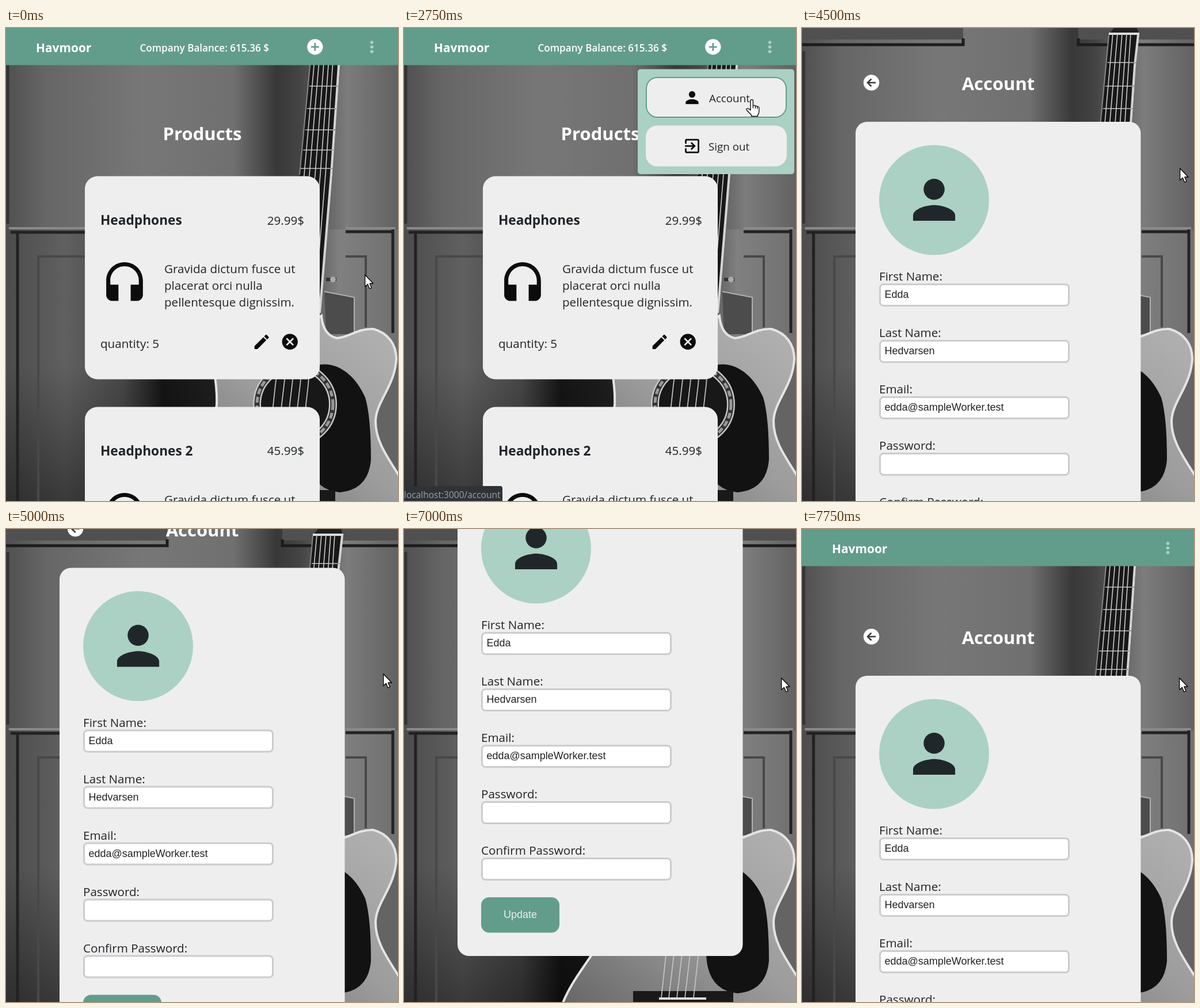
Animation of 681 by 822 pixels, one loop 8 s. Source, as an HTML page:

```html
<!DOCTYPE html>
<html lang="en">
<head>
<meta charset="utf-8">
<title>Shop account</title>
<style>
  html, body { margin: 0; width: 100%; height: 100%; overflow: hidden; background: #555; }
  svg { display: block; width: 100vw; height: 100vh; }
  text { font: 20.6px "Open Sans", "Noto Sans", sans-serif; fill: #212529; white-space: pre; }
  .brand { font-size: 20.9px; font-weight: 700; fill: #fff; }
  .balance { font-size: 17.1px; font-weight: 600; fill: #fff; }
  .title { font-size: 31px; font-weight: 700; fill: #fff; text-anchor: middle; }
  .name { font-size: 22.7px; font-weight: 700; }
  .price { text-anchor: end; }
  .entry { font: 18px "Liberation Sans", Arial, sans-serif; fill: #222; }
  .item { font-size: 18.8px; }
  .link { font-size: 15.5px; fill: #9da2a6; }
  .paper { fill: #eee; }
  .green { fill: #629d8b; }
  .mint { fill: #abd1c4; }
  .ink { fill: #0c0c0c; }
  .box { fill: #fff; stroke: #ccc; stroke-width: 3; }
  .line { fill: none; }

  .step { animation: 8s step-end infinite; }
  #shop { animation-name: shop; }
  #account { animation-name: account; }
  #scroll { animation-name: scroll; }
  #menu { animation-name: menu; }
  #ring { animation-name: ring; }
  #hover { animation-name: hover; }
  #status { animation-name: status; }
  #pointer { animation-name: move; }
  #arrow { animation-name: arrow; }
  #hand { animation-name: hand; }

  @keyframes shop { 0% { visibility: visible } 37.5%, 100% { visibility: hidden } }
  @keyframes account { 0% { visibility: hidden } 37.5%, 100% { visibility: visible } }
  @keyframes menu { 0% { opacity: 0 } 21.875% { opacity: 1 } 37.5%, 100% { opacity: 0 } }
  @keyframes ring { 0% { opacity: 0 } 12.5% { opacity: .06 } 28.125%, 100% { opacity: 0 } }
  @keyframes hover { 0% { opacity: 0 } 28.125% { opacity: 1 } 37.5%, 100% { opacity: 0 } }
  @keyframes status {
    0% { opacity: 0 } 31.25% { opacity: .6 } 34.375% { opacity: 1 }
    40.625% { opacity: .5 } 43.75%, 100% { opacity: 0 }
  }
  @keyframes scroll {
    0% { transform: translateY(0) }
    56.25% { transform: translateY(-92px) }
    59.375% { transform: translateY(-137px) }
    62.5% { transform: translateY(-187.5px) }
    65.625% { transform: translateY(-290px) }
    68.75% { transform: translateY(-405px) }
    71.875% { transform: translateY(-408px) }
    87.5% { transform: translateY(-357px) }
    90.625% { transform: translateY(-160px) }
    93.75% { transform: translateY(-9px) }
    96.875%, 100% { transform: translateY(0) }
  }
  @keyframes move {
    0% { transform: translate(623px, 428px) }
    3.125% { transform: translate(581px, 337px) }
    6.25% { transform: translate(589px, 144px) }
    9.375% { transform: translate(633px, 67px) }
    12.5% { transform: translate(644px, 31px) }
    15.625% { transform: translate(643px, 43px) }
    28.125% { transform: translate(613px, 131px) }
    31.25% { transform: translate(594px, 123px) }
    37.5% { transform: translate(603px, 118px) }
    40.625% { transform: translate(618px, 160px) }
    43.75% { transform: translate(662px, 239px) }
    46.875% { transform: translate(656px, 243px) }
    62.5% { transform: translate(655px, 251px) }
    68.75%, 100% { transform: translate(655px, 258px) }
  }
  @keyframes arrow { 0% { opacity: 1 } 12.5% { opacity: 0 } 37.5%, 100% { opacity: 1 } }
  @keyframes hand { 0% { opacity: 0 } 12.5% { opacity: 1 } 37.5%, 100% { opacity: 0 } }
</style>
</head>
<body>
<svg viewBox="0 0 681 822" preserveAspectRatio="none">
  <defs>
    <linearGradient id="wood">
      <stop offset="0" stop-color="#505050"/>
      <stop offset=".1" stop-color="#666"/>
      <stop offset=".35" stop-color="#777"/>
      <stop offset=".58" stop-color="#707070"/>
      <stop offset=".69" stop-color="#383838"/>
      <stop offset=".75" stop-color="#444"/>
      <stop offset=".87" stop-color="#7c7c7c"/>
      <stop offset="1" stop-color="#626262"/>
    </linearGradient>
    <linearGradient id="panel">
      <stop offset="0" stop-color="#4c4c4c"/>
      <stop offset=".15" stop-color="#606060"/>
      <stop offset=".3" stop-color="#484848"/>
      <stop offset=".4" stop-color="#151515"/>
      <stop offset=".7" stop-color="#2c2c2c"/>
      <stop offset=".85" stop-color="#808080"/>
      <stop offset="1" stop-color="#707070"/>
    </linearGradient>
    <linearGradient id="floor" x2="0" y2="1">
      <stop offset=".5" stop-opacity="0"/>
      <stop offset="1" stop-opacity=".4"/>
    </linearGradient>
    <linearGradient id="body" x1="1" y1="0" x2="0" y2="1">
      <stop offset="0" stop-color="#b4b4b4"/>
      <stop offset=".5" stop-color="#9c9c9c"/>
      <stop offset="1" stop-color="#666"/>
    </linearGradient>
    <path id="person" d="M12 12c2.21 0 4-1.79 4-4s-1.79-4-4-4-4 1.79-4 4 1.79 4 4 4zm0 2c-2.67 0-8 1.34-8 4v2h16v-2c0-2.66-5.33-4-8-4z"/>
    <g id="dots" class="mint">
      <circle cx="635.5" cy="25" r="2.8"/><circle cx="635.5" cy="33" r="2.8"/><circle cx="635.5" cy="41" r="2.8"/>
    </g>
    <g id="bar">
      <rect class="green" width="681" height="64.5"/>
      <text class="brand" x="52" y="42">Havmoor</text>
    </g>
    <g id="card">
      <rect class="paper" x="137" y="257.5" width="408" height="353" rx="22"/>
      <path class="ink" transform="translate(163.5 403.5) scale(3.54)" d="M12 1c-4.97 0-9 4.03-9 9v7c0 1.66 1.34 3 3 3h3v-8H5v-2c0-3.87 3.13-7 7-7s7 3.13 7 7v2h-4v8h3c1.66 0 3-1.34 3-3v-7c0-4.97-4.03-9-9-9z"/>
      <text x="275" y="426">Gravida dictum fusce ut</text>
      <text x="275" y="455">placerat orci nulla</text>
      <text x="275" y="484">pellentesque dignissim.</text>
      <text x="164" y="556">quantity: 5</text>
      <path class="ink" transform="translate(427.5 528.8) scale(1.39)" d="M3 17.25V21h3.75L17.81 9.94l-3.75-3.75L3 17.25zM20.71 7.04c.39-.39.39-1.02 0-1.41l-2.34-2.34c-.39-.39-1.02-.39-1.41 0l-1.83 1.83 3.75 3.75 1.83-1.83z"/>
      <path class="ink" transform="translate(476.8 528.8) scale(1.37)" d="M12 2C6.47 2 2 6.47 2 12s4.47 10 10 10 10-4.47 10-10S17.53 2 12 2zm5 13.59L15.59 17 12 13.41 8.41 17 7 15.59 10.59 12 7 8.41 8.41 7 12 10.59 15.59 7 17 8.41 13.41 12 17 15.59z"/>
    </g>
    <rect id="field" class="box" x="135.5" y="537.5" width="328" height="37" rx="6"/>
  </defs>

  <!-- fixed backdrop: door and guitar -->
  <g>
    <rect width="681" height="360" fill="url(#wood)"/>
    <rect y="350" width="681" height="472" fill="url(#panel)"/>
    <rect y="350" width="681" height="472" fill="url(#floor)"/>
    <path d="M0 0H280V20H0zM480 0H681V20H480z" fill="#505050"/>
    <path class="line" d="M0 29H280V18M480 18V29H681" stroke="#1c1c1c" stroke-width="5"/>
    <path d="M3 40V340" stroke="#333" stroke-width="5"/>
    <path d="M5 348H137M590 348H676" stroke="#8a8a8a" stroke-width="4"/>
    <path class="line" d="M8 355H137M590 354H672M20 356V822M672 350V530" stroke="#222" stroke-width="5"/>
    <path class="line" d="M56 822V397H137M590 397H625V520" stroke="#484848" stroke-width="4"/>
    <path d="M553 458L606 468V532H556z" fill="#4c4c4c"/>
    <path class="line" d="M553 458L605 468V530" stroke="#b0b0b0" stroke-width="2"/>
    <path d="M556 437H574" stroke="#333" stroke-width="6"/>
    <circle cx="568" cy="437" r="5" fill="#aaa"/>
    <path d="M640 522Q681 540 681 600V790L640 700z" fill="#646464"/>
    <path d="M275 826C298 765 360 712 366 655Q367 630 362 600L460 560L548 500Q551 534 575 539C596 538 610 522 638 523C664 530 678 550 678 575C676 622 642 650 642 684C642 722 668 752 690 790V826z" fill="url(#body)" stroke="#e4e4e4" stroke-width="4"/>
    <path d="M545 585C582 580 610 610 624 642Q634 675 634 750Q630 802 580 807Q526 802 525 736Q530 690 545 660z" fill="#121212"/>
    <circle cx="502" cy="654" r="66" fill="#181818" stroke="#c8c8c8" stroke-width="14"/>
    <circle class="line" cx="502" cy="654" r="66" stroke="#333" stroke-width="9"/>
    <circle class="line" cx="502" cy="654" r="66" stroke="#999" stroke-width="5" stroke-dasharray="10 5"/>
    <path d="M534 9L585 9L580 64L567 255L545 495L530 600H462L489 480L510 255L528 64z" fill="#181818"/>
    <path d="M542 0H582L585 10H534z" fill="#202020"/>
    <path d="M533 10H586" stroke="#ddd" stroke-width="4"/>
    <path class="line" d="M584 12L578 66L565 255L545 495" stroke="#d4d4d4" stroke-width="4"/>
    <path class="line" d="M533 12L528 66L510 255" stroke="#888" stroke-width="2"/>
    <path d="M531 60H581M527 101H577M523 140H574M520 177H572M516 212H569M512 244H567" stroke="#999" stroke-width="2"/>
    <path d="M398 803H572V822H398z" fill="#191919"/>
    <path d="M443 816H525" stroke="#ddd" stroke-width="4"/>
    <path class="line" d="M540 10L518 255L468 620L447 815M548 10L527 255L483 620L460 815M556 10L537 255L497 620L474 815M564 10L546 255L511 620L488 815M571 10L555 255L525 620L503 815" stroke="#c4c4c4" stroke-width="1.7"/>
  </g>

  <g id="shop" class="step">
    <text class="title" x="341" y="195">Products</text>
    <use href="#card"/>
    <text class="name" x="164" y="342">Headphones</text>
    <text class="price" x="518" y="342">29.99$</text>
    <use href="#card" y="401"/>
    <text class="name" x="164" y="743">Headphones 2</text>
    <text class="price" x="518" y="742">45.99$</text>
    <use href="#bar"/>
    <text class="balance" x="232.5" y="41">Company Balance: 615.36 $</text>
    <path fill="#fff" transform="translate(520.4 16.4) scale(1.37)" d="M12 2C6.48 2 2 6.48 2 12s4.48 10 10 10 10-4.48 10-10S17.52 2 12 2zm5 11h-4v4h-2v-4H7v-2h4V7h2v4h4v2z"/>
    <circle id="ring" class="step" cx="635" cy="33.5" r="28.5"/>
    <use href="#dots"/>
    <g id="menu" class="step">
      <rect class="mint" x="406" y="71.5" width="272" height="182.5" rx="5"/>
      <rect class="paper" x="420" y="85" width="245" height="71" rx="20"/>
      <rect class="paper" x="420" y="169.5" width="245" height="71" rx="20"/>
      <rect id="hover" class="step line" x="421" y="86" width="243" height="69" rx="19" stroke="#629d8b" stroke-width="2"/>
      <use href="#person" class="ink" transform="translate(483.7 104.2) scale(1.4)"/>
      <text class="item" x="530" y="129">Account</text>
      <path class="ink" transform="translate(484 188.5) scale(1.38)" d="M10.09 15.59L11.5 17l5-5-5-5-1.41 1.41L12.67 11H3v2h9.67l-2.58 2.59zM19 3H5c-1.11 0-2 .9-2 2v4h2V5h14v14H5v-4H3v4c0 1.1.89 2 2 2h14c1.1 0 2-.9 2-2V5c0-1.1-.9-2-2-2z"/>
      <text class="item" x="529" y="213">Sign out</text>
    </g>
  </g>

  <g id="account" class="step">
    <g id="scroll" class="step">
      <circle cx="120.5" cy="187" r="13.7" fill="#fff"/>
      <path class="line" d="M128 187H114.5M120.5 180.500L114 187L120.5 193.500" stroke="#3c3c3c" stroke-width="2.6"/>
      <text class="title" x="341" y="200">Account</text>
      <rect class="paper" x="93" y="255" width="495.5" height="844" rx="20"/>
      <circle class="mint" cx="229.5" cy="391" r="95.5"/>
      <use href="#person" fill="#20272a" transform="translate(174.7 335.7) scale(4.57)"/>
      <text x="134" y="531">First Name:</text>
      <use href="#field"/>
      <text class="entry" x="143.5" y="561">Edda</text>
      <text x="134" y="629">Last Name:</text>
      <use href="#field" y="98"/>
      <text class="entry" x="143.5" y="659">Hedvarsen</text>
      <text x="134" y="727">Email:</text>
      <use href="#field" y="196"/>
      <text class="entry" x="143.5" y="757">edda@sampleWorker.test</text>
      <text x="134" y="825">Password:</text>
      <use href="#field" y="294"/>
      <text x="134" y="923">Confirm Password:</text>
      <use href="#field" y="392"/>
      <rect class="green" x="134" y="997" width="136" height="61.5" rx="14"/>
      <text class="entry" x="173" y="1033" style="fill:#eee">Update</text>
      <use href="#bar"/>
      <use href="#dots"/>
    </g>
  </g>

  <g id="status" class="step">
    <path d="M0 796H167Q171 796 171 800V822H0z" fill="#2f3337"/>
    <text class="link" x="0" y="816.5">localhost:3000/account</text>
  </g>

  <g id="pointer" class="step" fill="#fff" stroke="#000" stroke-width="1.3" stroke-linejoin="round">
    <path id="arrow" class="step" d="M.7 1V21.5L5.3 17.2L8.7 25L12 23.6L8.8 16H15z"/>
    <g id="hand" class="step">
      <path d="M8 18V3.5a2.2 2.2 0 0 1 4.4 0V12q3-1.5 4 .8q2.8-1 3.4 1q3-.6 3 2.5v5.5q0 4-2.3 6.5v2H9.5v-2L1.5 20q-1.5-2.5 .8-3.2q2.5-.3 5.7 3z"/>
      <path class="line" d="M12.4 12v4.5M16.4 13v4M19.8 14v3.5"/>
    </g>
  </g>
</svg>
</body>
</html>
```
